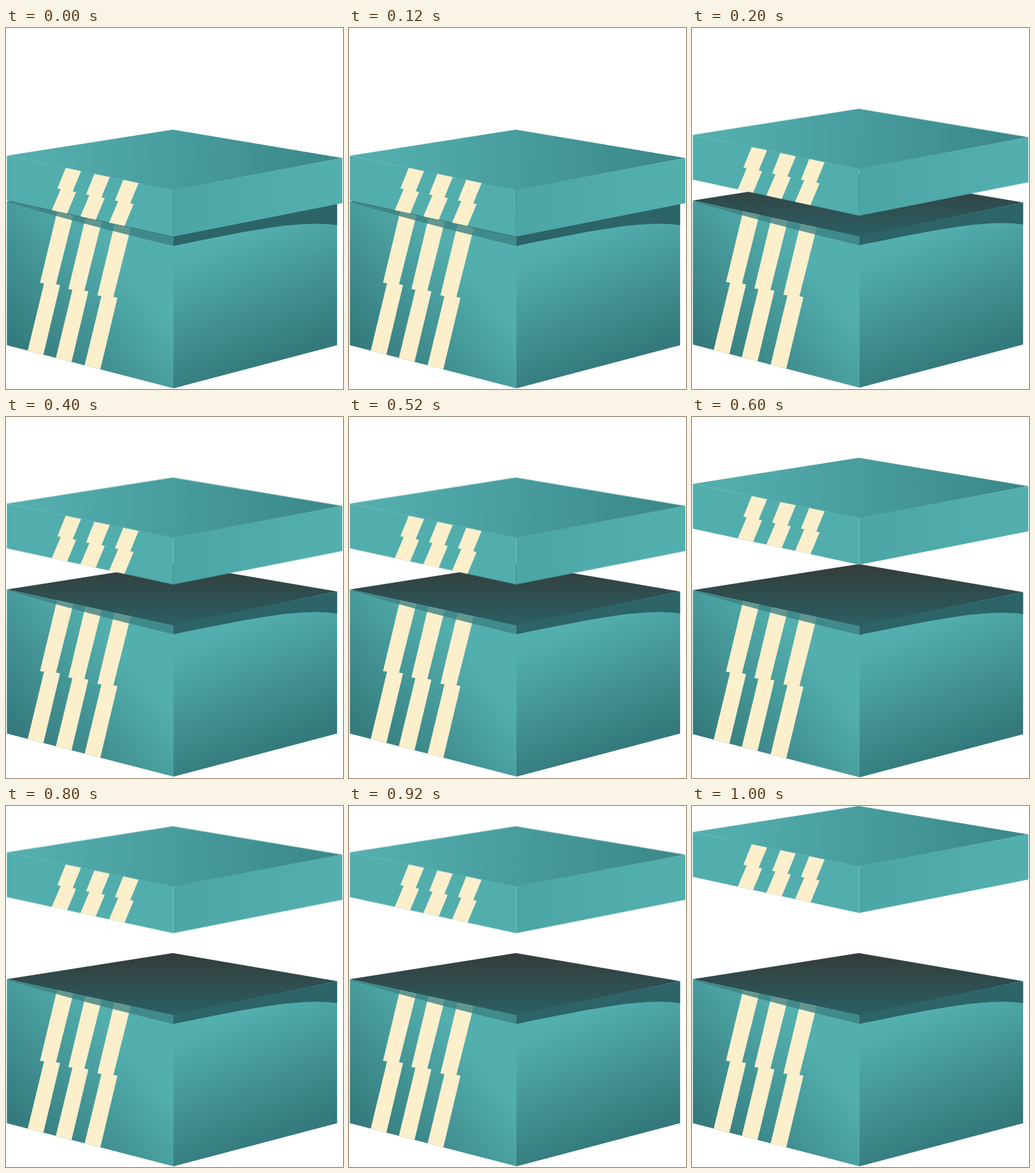
An HTML page for the animation above (1.2 s loop, 505 by 540 pixels).

```html
<!DOCTYPE html>
<html lang="en">
<head>
<meta charset="utf-8">
<title>Opening box</title>
<style>
  html, body { margin: 0; width: 100%; height: 100%; overflow: hidden; background: #fff; }
  svg { display: block; width: 100%; height: 100%; }
  .lid { animation: lift 1200ms step-end infinite; }
  .box { animation: settle 1200ms step-end infinite; }
  .cream { fill: #fcefcb; }
  @keyframes lift {
    0% { transform: translateY(0); }
    16.6667% { transform: translateY(-31.2px); }
    33.3333% { transform: translateY(-61.5px); }
    50% { transform: translateY(-91px); }
    66.6667% { transform: translateY(-121.7px); }
    83.3333%, 100% { transform: translateY(-152px); }
  }
  @keyframes settle {
    0% { transform: translateY(0); }
    16.6667% { transform: translateY(-1px); }
    50%, 100% { transform: translateY(0); }
  }
</style>
</head>
<body>
<svg viewBox="0 0 505 540">
  <defs>
    <linearGradient id="inside" gradientUnits="userSpaceOnUse" x1="250" y1="222" x2="250" y2="312">
      <stop offset="0" stop-color="#343c3b"/>
      <stop offset="1" stop-color="#2b5f63"/>
    </linearGradient>
    <linearGradient id="boxLeft" gradientUnits="userSpaceOnUse" x1="30" y1="500" x2="190" y2="370">
      <stop offset="0" stop-color="#34797c"/>
      <stop offset="1" stop-color="#53afae"/>
    </linearGradient>
    <linearGradient id="boxRight" gradientUnits="userSpaceOnUse" x1="300" y1="330" x2="375" y2="510">
      <stop offset="0" stop-color="#53afae"/>
      <stop offset="1" stop-color="#34797c"/>
    </linearGradient>
    <linearGradient id="lidTop" gradientUnits="userSpaceOnUse" x1="60" y1="190" x2="460" y2="205">
      <stop offset="0" stop-color="#53adad"/>
      <stop offset="1" stop-color="#3c8a8c"/>
    </linearGradient>
    <linearGradient id="lidRight" gradientUnits="userSpaceOnUse" x1="251" y1="0" x2="504" y2="0">
      <stop offset="0" stop-color="#4ca6a6"/>
      <stop offset="1" stop-color="#54afaf"/>
    </linearGradient>
    <clipPath id="boxClip"><path d="M1.3 259 251 313V539L1.3 474.5Z"/></clipPath>
    <clipPath id="lidClip"><path d="M1.3 191 250.5 242V312L1.3 258Z"/></clipPath>
    <path id="boxStripe" d="M76.5 275 101 280 75 383.3 81 384.5 55 493 31 489 57 382 51 381Z"/>
    <path id="lidStripe" d="M89.5 209 112.5 214 100 244.3 105 245.5 91 279 67.5 275 82 241 77 240Z"/>
  </defs>

  <g class="box">
    <path fill="url(#inside)" d="M1.3 259 250 220 496.2 262 251 313.5Z"/>
    <path fill="url(#boxLeft)" d="M1.3 259 251.3 313V539L1.3 474.5Z"/>
    <g class="cream" clip-path="url(#boxClip)">
      <use href="#boxStripe"/>
      <use href="#boxStripe" x="42.5" y="9.5"/>
      <use href="#boxStripe" x="86" y="19"/>
    </g>
    <path fill="#3b8183" fill-opacity=".8" d="M1.3 259 251 313V326Q120 295 8 262Z"/>
    <path fill="url(#boxRight)" d="M251 313 496.2 262V474.5L251 539Z"/>
    <path fill="#2c6468" d="M251 312.5 496.2 262V295C440 286 350 306 251 326Z"/>
  </g>

  <g class="lid">
    <path fill="url(#lidTop)" d="M1.3 191 250 152 504 194.5 250.5 242.5Z"/>
    <path fill="#52adad" d="M1.3 191 250.5 242V312L1.3 258Z"/>
    <path fill="url(#lidRight)" d="M250.5 242 504 194.5V262L250.5 312Z"/>
    <g class="cream" clip-path="url(#lidClip)">
      <use href="#lidStripe"/>
      <use href="#lidStripe" x="43" y="9"/>
      <use href="#lidStripe" x="86.2" y="18"/>
    </g>
  </g>
</svg>
</body>
</html>
```
